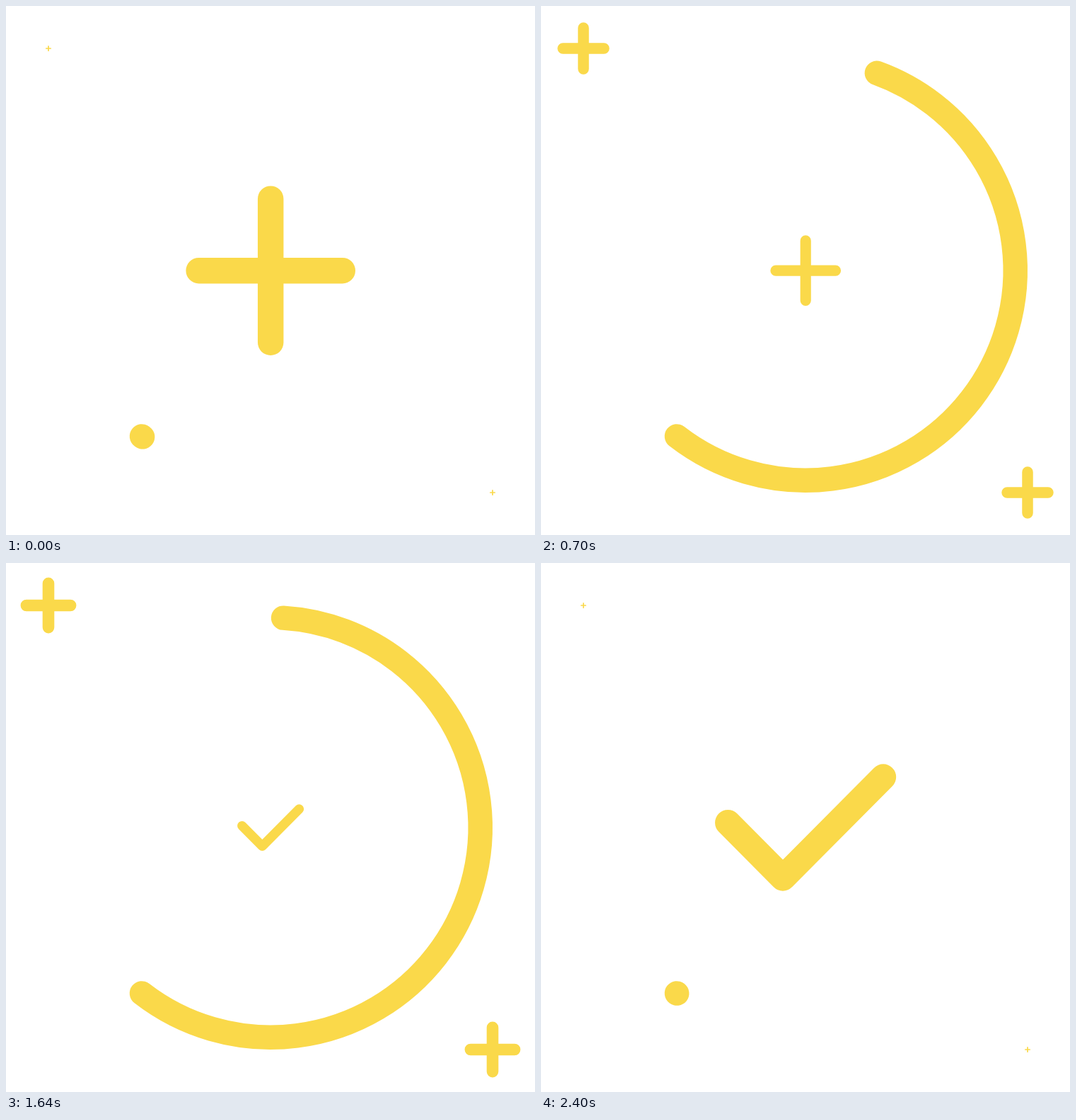
These frames come from a looping animation (748x748 px, 2420 ms). An HTML page with a canvas:

```html
<!DOCTYPE html>
<html lang="en">
<head>
<meta charset="utf-8">
<title>Plus to check</title>
<style>
  html, body { margin: 0; width: 100%; height: 100%; overflow: hidden; background: #fff; }
  canvas { display: block; }
</style>
</head>
<body>
<canvas id="stage" width="748" height="748"></canvas>
<script>
const ctx = document.getElementById('stage').getContext('2d');
const SIZE = 748, LOOP = 2420, HALF = 1200;
const CENTER = 374.2;
const RING = { center: 373.9, radius: 296.8, width: 34.5, start: 127.8, sweep: 338.8 };
const rad = deg => deg * Math.PI / 180;

// Strokes polylines given around (x, y), scaled about that point.
function strokeScaled(x, y, scale, width, lines) {
  ctx.save();
  ctx.translate(x, y);
  ctx.scale(scale, scale);
  ctx.lineWidth = width;
  ctx.beginPath();
  for (const [first, ...rest] of lines) {
    ctx.moveTo(...first);
    rest.forEach(point => ctx.lineTo(...point));
  }
  ctx.stroke();
  ctx.restore();
}

function plus(x, y, reach, width, scale) {
  const end = reach - width / 2;
  strokeScaled(x, y, scale, width, [[[-end, 0], [end, 0]], [[0, -end], [0, end]]]);
}

function check(scale) {
  strokeScaled(CENTER, CENTER, scale, 36.5,
    [[[-109.9, -7], [-32.2, 71.2], [109.7, -71.6]]]);
}

function ring(progress) {
  const from = rad(RING.start);
  const sweep = Math.max(rad(RING.sweep) * progress, 0.001);
  ctx.lineWidth = RING.width;
  ctx.beginPath();
  ctx.arc(RING.center, RING.center, RING.radius, from, from - sweep, true);
  ctx.stroke();
}

function draw(now) {
  const t = Math.min(now % LOOP, 2 * HALF);
  const progress = 1 - Math.abs(t - HALF) / HALF;

  ctx.fillStyle = '#fff';
  ctx.fillRect(0, 0, SIZE, SIZE);
  ctx.strokeStyle = '#fad94a';
  ctx.lineCap = ctx.lineJoin = 'round';

  ring(progress);
  const cornerScale = (4 + 56 * progress) / 60;
  plus(60, 60, 60, 25.3, cornerScale);
  plus(688, 688, 60, 25.3, cornerScale);

  if (t < HALF) plus(CENTER, CENTER, 119.9, 36.5, 1 - progress);
  else check(1 - progress);
}

function tick() {
  draw(performance.now());
  requestAnimationFrame(tick);
}
tick();
</script>
</body>
</html>
```
